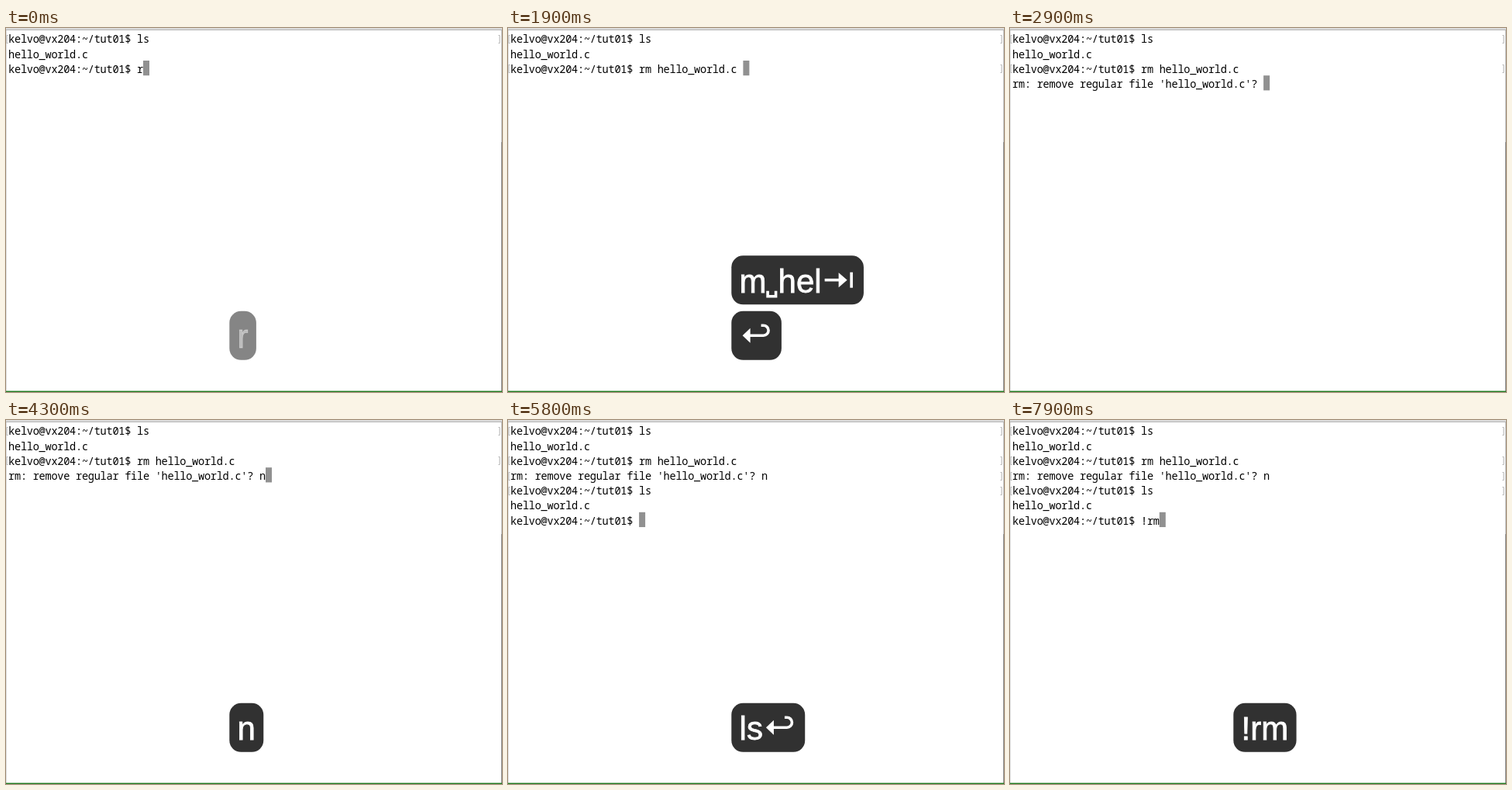
Write an HTML page with a canvas that moves like this. It is 640 px wide and 469 px high and loops after 8 s.

```html
<!DOCTYPE html>
<html lang="en">
<head>
<meta charset="utf-8">
<title>Terminal session</title>
<style>
  html, body { margin: 0; width: 100%; height: 100%; overflow: hidden; background: #fff; }
  canvas { display: block; }
</style>
</head>
<body>
<canvas id="stage" width="640" height="469"></canvas>
<script>
const ctx = document.getElementById('stage').getContext('2d');
const LOOP = 8000;
const STEP = 100;
const CELL = 7.9;
const LINE = 19.2;
const PADDING = 10.3;
const PROMPT = 'kelvo@vx204:~/tut01$ ';

// Text appended to the terminal: [time, text]
const stream = [
  [0, PROMPT + 'ls\nhello_world.c\n' + PROMPT + 'r'],
  [400, 'm'], [600, ' '], [800, 'h'], [900, 'e'], [1100, 'l'],
  [1300, 'lo_world.c '],
  [2000, "\nrm: remove regular file 'hello_world.c'? "],
  [4300, 'n'],
  [4800, '\n' + PROMPT],
  [5400, 'l'], [5500, 's'],
  [5800, '\nhello_world.c\n' + PROMPT],
  [7500, '!'], [7900, 'rm']
];

// Marked command rows: [time, row]
const marks = [[0, 0], [1300, 2], [4800, 3], [5800, 4]];

// Key captions; lift is when a newer caption pushes this one up
const captions = [
  { keys: [[0, 'r']], fade: 0, end: 200 },
  { keys: [[400, 'm'], [600, '␣'], [800, 'h'], [900, 'e'], [1100, 'l'], [1200, '⇥']],
    lift: 1900, fade: 2200, end: 2300 },
  { keys: [[1900, '↩']], end: 2900 },
  { keys: [[3900, 'n']], lift: 4700, fade: 4800, end: 4900 },
  { keys: [[4700, '↩']], lift: 5400, fade: 5600, end: 5700 },
  { keys: [[5400, 'l'], [5500, 's'], [5700, '↩']], end: 6700 },
  { keys: [[7500, '!'], [7700, 'r'], [7900, 'm']], end: LOOP }
];

function rect(color, x, y, w, h) {
  ctx.fillStyle = color;
  ctx.fillRect(x, y, w, h);
}

function line(...points) {
  ctx.beginPath();
  points.forEach(([x, y]) => ctx.lineTo(x, y));
  ctx.stroke();
}

function arrowHead(tip, base, y) {
  ctx.beginPath();
  ctx.moveTo(tip, y);
  ctx.lineTo(base, y - 9.5);
  ctx.lineTo(base, y + 9.5);
  ctx.fill();
}

// Drawn keys; x is the left of the key, y the text baseline
const symbols = {
  '␣': { width: 15, draw(x, y) {
    line([x + 1.5, y - 2], [x + 1.5, y + 5], [x + 12, y + 5], [x + 12, y - 2]);
  } },
  '⇥': { width: 44, draw(x, y) {
    line([x + 4, y - 16], [x + 25, y - 16]);
    arrowHead(x + 33, x + 22, y - 16);
    line([x + 38.5, y - 26], [x + 38.5, y - 6]);
  } },
  '↩': { width: 44, draw(x, y) {
    arrowHead(x + 4, x + 14, y - 16);
    ctx.beginPath();
    ctx.moveTo(x + 12, y - 16);
    ctx.lineTo(x + 31, y - 16);
    ctx.arc(x + 31, y - 22.5, 6.5, Math.PI / 2, -Math.PI / 2, true);
    ctx.lineTo(x + 28, y - 29);
    ctx.stroke();
  } }
};

const keyWidth = key => symbols[key]?.width ?? ctx.measureText(key).width;

function drawKey(key, x, y) {
  ctx.lineWidth = symbols[key] ? 3.6 : 0.8;
  if (symbols[key]) return symbols[key].draw(x, y);
  ctx.fillText(key, x, y);
  ctx.strokeText(key, x, y);
}

function drawCaption({ keys, lift = Infinity, fade = Infinity, end }, t) {
  const shown = keys.filter(([time]) => time <= t).map(([, key]) => key);
  if (!shown.length || t >= end) return;

  const fading = t >= fade;
  const alpha = fading ? 0.59 * (end - t) / (end - fade) : 1;
  const top = t >= lift ? 293.3 : 364.8;
  ctx.font = '42px "Liberation Sans", sans-serif';
  const width = shown.reduce((sum, key) => sum + keyWidth(key), 2 * PADDING);

  ctx.globalAlpha = alpha;
  ctx.fillStyle = '#313131';
  ctx.beginPath();
  ctx.roundRect(288.3, top, width, 63, Math.min(15, width / 2));
  ctx.fill();

  ctx.globalAlpha = fading ? alpha * 0.75 : 1;
  ctx.fillStyle = ctx.strokeStyle = '#fff';
  let x = 288.3 + PADDING;
  for (const key of shown) {
    drawKey(key, x, top + 47.4);
    x += keyWidth(key);
  }
  ctx.globalAlpha = 1;
}

function drawFrame() {
  rect('#fff', 0, 0, 640, 469);
  rect('#dcdcdc', 0, 0, 640, 2);
  rect('#b4b4b4', 0, 2, 640, 1);
  rect('#c8c8c8', 0, 3, 0.6, 465);
  rect('#8c8c8c', 639.4, 3, 0.6, 144);
  rect('#303030', 639.4, 147, 0.6, 321);
  rect('#1f7a1f', 0, 467.6, 640, 1.4);
}

function drawTerminal(t) {
  const rows = stream.filter(([time]) => time <= t).map(([, text]) => text).join('').split('\n');
  const last = rows.length - 1;
  rect('#919191', 3.2 + rows[last].length * CELL, 3.6 + last * LINE, 8, LINE);

  ctx.font = '500 13.6px "Noto Sans Mono", monospace';
  ctx.fillStyle = '#000';
  rows.forEach((text, row) => [...text].forEach((char, column) =>
    ctx.fillText(char, 3.1 + column * CELL, 19.3 + row * LINE)));

  ctx.strokeStyle = '#b0b0b0';
  ctx.lineWidth = 1;
  for (const [time, row] of marks) {
    if (time > t) continue;
    const y = Math.round(row * LINE) + 9.5;
    line([2.5, y], [1, y], [1, y + 10], [2.5, y + 10]);
    line([635.5, y], [637, y], [637, y + 10], [635.5, y + 10]);
  }
}

function render() {
  const t = Math.floor(performance.now() % LOOP / STEP) * STEP;
  drawFrame();
  drawTerminal(t);
  captions.forEach(caption => drawCaption(caption, t));
  requestAnimationFrame(render);
}

render();
</script>
</body>
</html>
```
